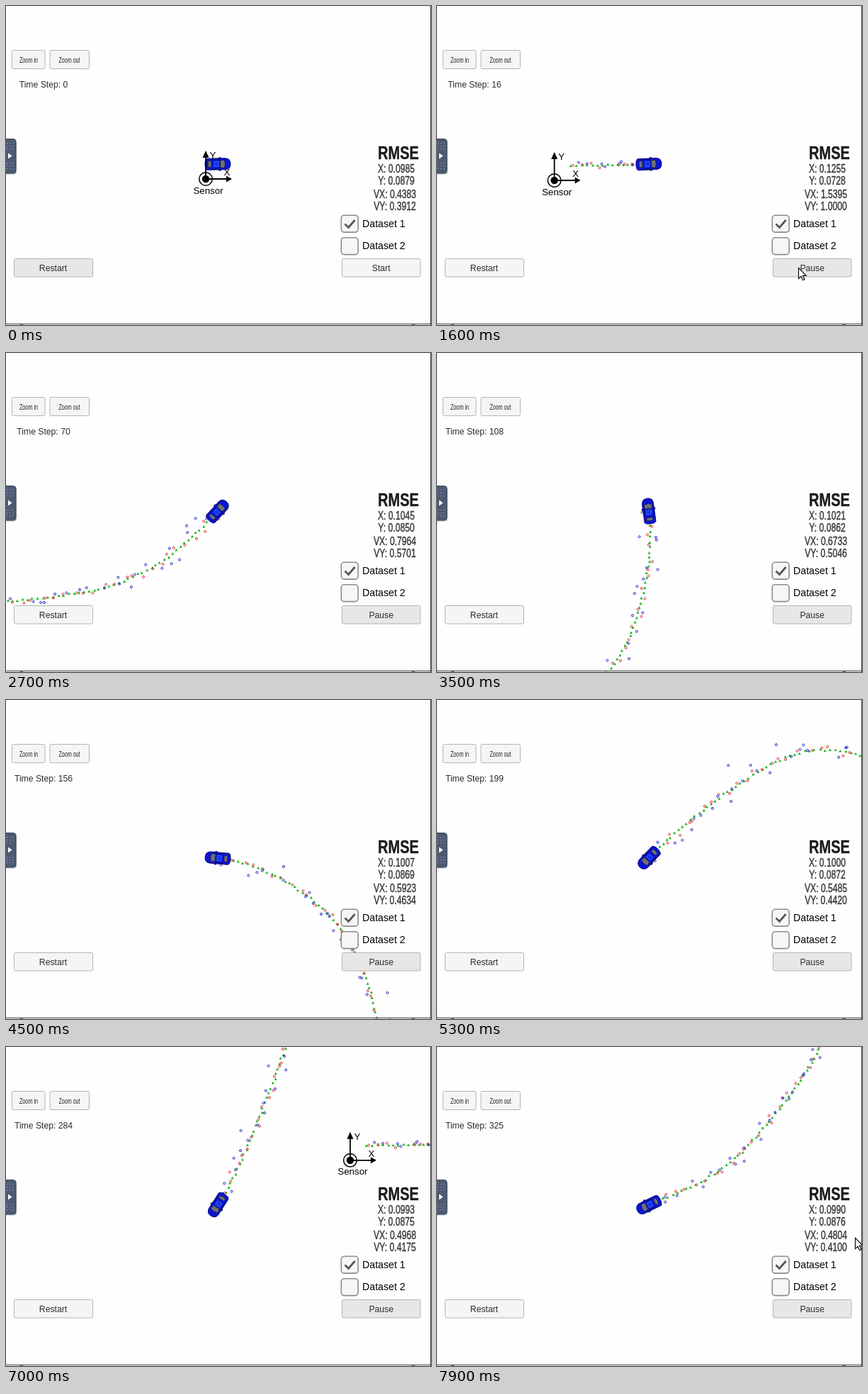
Animation of 600 by 450 pixels, one loop 8000 ms. Source, as an HTML page:

```html
<!DOCTYPE html>
<html lang="en">
<head>
<meta charset="utf-8">
<title>Sensor fusion simulator</title>
<style>
  html, body { margin: 0; width: 100%; height: 100%; overflow: hidden; background: #fefefe; }
  svg { display: block; width: 600px; height: 450px; font-family: "Liberation Sans", Arial, sans-serif; }
  .mid { text-anchor: middle; }
  .button { fill: #f5f5f5; stroke: #b4b4b4; }
  .box { fill: #f6f6f6; stroke: #8c8c8c; stroke-width: 1.6; }
  .label { font-size: 12.2px; fill: #2c2c2c; text-anchor: middle; }
  .name { font-size: 14.2px; fill: #000; }
  .small { font-size: 10.5px; fill: #222; text-anchor: middle; }
  .value { font-size: 16px; fill: #3a3a3a; stroke: #3a3a3a; stroke-width: .45; text-anchor: middle; }
</style>
</head>
<body>
<svg viewBox="0 0 600 450">
  <defs>
    <pattern id="dots" width="4" height="4" patternUnits="userSpaceOnUse">
      <rect x="1" y="1" width="1.2" height="1.2" fill="#8fa3c4"/>
    </pattern>
  </defs>
  <rect width="600" height="450" fill="#fefefe"/>

  <g id="trail" fill="none">
    <path id="green" fill="#14b414"/>
    <path id="red" stroke="#e03030"/>
    <path id="blue" stroke="#2020c8"/>
  </g>

  <g id="car">
    <path d="M3 -9.5l2 1.5h-4zM3 9.5l2 -1.5h-4z" fill="#101060" stroke="#101060"/>
    <path d="M-15 -8H11Q18 -7 18 0T11 8H-15Q-18 7 -18 0T-15 -8Z" fill="#0a14d8" stroke="#080a80"/>
    <path d="M-13 -5Q-15 0 -13 5L-9 4V-4ZM3 -4.5L9 -6Q12 0 9 6L3 4.5Q4.5 0 3 -4.5Z" fill="#6d7076" stroke="#15153c" stroke-width=".8"/>
    <path d="M-8 -6.3H3M-8 6.3H3" stroke="#10104a"/>
    <path d="M-5 -3.5H1V3.5H-5Z" fill="#1530e6" stroke="#3c78ff" stroke-width=".8"/>
  </g>

  <g id="sensor">
    <circle r="9.3" fill="none" stroke="#000" stroke-width="1.5"/>
    <circle r="5.2"/>
    <path d="M0 0V-32M0 0H30" stroke="#000" stroke-width="1.8"/>
    <path d="M0 -40l4.5 10h-9zM37 0l-8 -4.5v9z"/>
    <g class="mid" font-size="13.3">
      <text x="10" y="-29">Y</text>
      <text x="30" y="-5">X</text>
      <text x="3.5" y="20.5">Sensor</text>
    </g>
  </g>

  <path d="M599.5 0V450M0 448.5H600" stroke="#444"/>
  <path d="M20 449.5h4M573 449.5h4" stroke="#777"/>

  <rect class="button" x="8.5" y="62.5" width="46.5" height="26" rx="2"/>
  <rect class="button" x="62" y="62.5" width="55.5" height="26" rx="2"/>
  <text class="small" transform="translate(32 79.5) scale(.69 1)">Zoom in</text>
  <text class="small" transform="translate(89.5 79.5) scale(.68 1)">Zoom out</text>
  <text id="time" class="label" x="53" y="115.3"></text>

  <rect x="-6" y="188" width="21" height="49.5" rx="4" fill="#b8bcc4"/>
  <rect x="-6" y="187.5" width="20" height="48.5" rx="4" fill="#4c5a72" stroke="#3d495e"/>
  <rect y="191" width="12" height="42" fill="url(#dots)"/>
  <rect x="1" y="204" width="10" height="15" fill="#4c5a72"/>
  <path d="M3 207.5l5.5 4l-5.5 4z" fill="#fff"/>

  <text class="mid" transform="translate(554 216) scale(.8 1)" font-size="25" font-weight="bold"
    fill="#1c1c1c" stroke="#1c1c1c" stroke-width=".4">RMSE</text>
  <text id="x" class="value" transform="translate(551 234.5) scale(.76 1)"></text>
  <text id="y" class="value" transform="translate(551 252) scale(.76 1)"></text>
  <text id="vx" class="value" transform="translate(549 271) scale(.76 1)"></text>
  <text id="vy" class="value" transform="translate(549 288) scale(.76 1)"></text>

  <rect class="box" x="473.3" y="295.3" width="23.8" height="23.8" rx="4"/>
  <path d="M478.5 307.5l5 5l9 -10.5" fill="none" stroke="#555" stroke-width="2.7"/>
  <rect class="box" x="473.3" y="326.8" width="23.8" height="23.8" rx="4"/>
  <text class="name" x="503" y="312">Dataset 1</text>
  <text class="name" x="503" y="343.3">Dataset 2</text>

  <rect id="restart" class="button" x="11.5" y="356.5" width="111" height="25.5" rx="2"/>
  <text class="label" x="66.5" y="374.3">Restart</text>
  <rect id="run" class="button" x="474.5" y="356.5" width="110.5" height="25.5" rx="2"/>
  <text id="runText" class="label" x="529.7" y="374.3"></text>

  <path id="cursor" d="M0 0V15L3.5 11.7L6 17.3L8.4 16.2L6 10.8H10.6Z" fill="#fff" stroke="#111" stroke-width="1.2"/>
</svg>
<script>
const LOOP = 8000, TICK = 100, STEPS = 325, RUN_START = 1500;
const CAR = [299, 223];
const el = Object.fromEntries([...document.querySelectorAll('[id]')].map(e => [e.id, e]));

// Bends of the drive, in pixels from the sensor; the car covers them at an even speed.
const bends = [
  [17, -21], [134, -23], [252, -32], [357, -55], [442, -109], [528, -205], [568, -325],
  [563, -440], [509, -552], [407, -625], [300, -639], [193, -583], [74, -482],
  [-9, -362], [-72, -209], [-123, -74], [-188, 65], [-295, 192], [-409, 252]
];
// The simulator's pace drifts a little: [ms, time step].
const pace = [[1400, 0], [1600, 16], [2700, 70], [4500, 156], [6000, 236], [7000, 284], [7900, STEPS]];

// Running error: a floor plus an initial error that averages out.
const rmse = (floor, initial) => n => Math.sqrt(floor + initial / n).toFixed(4);
const errors = { x: rmse(.0095, .1), y: rmse(.0078, -.04), vx: rmse(.12, 36), vy: rmse(.125, 14) };
const EARLIER_RUN = 499;

function stepAt(t) {
  const i = pace.findIndex(([ms]) => ms > t);
  if (i === 0) return 0;
  if (i < 0) return STEPS;
  const [t0, s0] = pace[i - 1], [t1, s1] = pace[i];
  return Math.round(s0 + (s1 - s0) * (t - t0) / (t1 - t0));
}

// Catmull-Rom curve through the bends as path data.
function curve(points) {
  const at = i => points[Math.max(0, Math.min(points.length - 1, i))];
  const handle = (i, sign) => at(i).map((v, k) => v + sign * (at(i + 1)[k] - at(i - 1)[k]) / 6);
  return `M${points[0]}` + points.slice(1)
    .map((p, i) => `C${handle(i, 1)} ${handle(i + 1, -1)} ${p}`).join('');
}

const route = document.createElementNS('http://www.w3.org/2000/svg', 'path');
route.setAttribute('d', curve(bends));
const stride = route.getTotalLength() / STEPS;

function position(step) {
  const { x, y } = route.getPointAtLength(step * stride);
  return [x, y];
}

function heading(step) {
  const [x0, y0] = position(Math.max(0, step - 1));
  const [x1, y1] = position(Math.min(STEPS, step + 1));
  return Math.atan2(y1 - y0, x1 - x0) * 180 / Math.PI;
}

let seed = 20;
const random = () => (seed = seed * 16807 % 2147483647) / 2147483647;
const gauss = () => (random() + random() + random() + random() - 2) * 1.73;
const fix = v => v.toFixed(1);
const ring = (x, y) => `M${fix(x - 1.5)} ${fix(y)}a1.5 1.5 0 1 1 3 0a1.5 1.5 0 1 1 -3 0`;
const triangle = (x, y) => `M${fix(x)} ${fix(y - 2)}l2 3.6h-4z`;

// Lidar errors are equal in x and y; radar errors lie in range and bearing.
const marks = { green: [], red: [], blue: [] };
for (let step = 1; step <= STEPS; step++) {
  const [x, y] = position(step);
  marks.green.push(triangle(x + gauss() * .8, y + gauss() * .8));
  if (step % 2) {
    marks.red.push(ring(x + gauss() * 3, y + gauss() * 3));
  } else {
    const range = Math.hypot(x, y) + gauss() * 7;
    const bearing = Math.atan2(y, x) + gauss() * .022;
    marks.blue.push(ring(range * Math.cos(bearing), range * Math.sin(bearing)));
  }
}

function cursorAt(t) {
  if (t >= RUN_START && t < 2300) return [510.5, 369.5];
  if (t >= 7700) return [590.5, 269.5];
  return null;
}

function draw(t) {
  const step = stepAt(t);
  const [x, y] = position(step);
  const origin = `translate(${fix(CAR[0] - x)} ${fix(CAR[1] - y)})`;
  el.sensor.setAttribute('transform', origin);
  el.trail.setAttribute('transform', origin);
  el.car.setAttribute('transform', `translate(${CAR}) rotate(${fix(heading(step))})`);

  const counts = { green: step, red: Math.ceil(step / 2), blue: Math.floor(step / 2) };
  for (const key in counts) el[key].setAttribute('d', marks[key].slice(0, counts[key]).join(''));

  el.time.textContent = `Time Step: ${step}`;
  for (const key in errors)
    el[key].textContent = `${key.toUpperCase()}: ${errors[key](step || EARLIER_RUN)}`;

  const running = t >= RUN_START;
  el.runText.textContent = running ? 'Pause' : 'Start';
  el.restart.style.fill = running ? '#f5f5f5' : '#e7e7e7';
  el.run.style.fill = running ? '#e7e7e7' : t >= 1300 ? '#d0d0d0' : t >= 900 ? '#ececec' : '#f5f5f5';

  const cursor = cursorAt(t);
  el.cursor.style.display = cursor ? '' : 'none';
  if (cursor) el.cursor.setAttribute('transform', `translate(${cursor})`);
}

const start = performance.now();
let shown = -1;
function frame() {
  const t = Math.floor((performance.now() - start) % LOOP / TICK) * TICK;
  if (t !== shown) draw(shown = t);
  requestAnimationFrame(frame);
}
frame();
</script>
</body>
</html>
```
